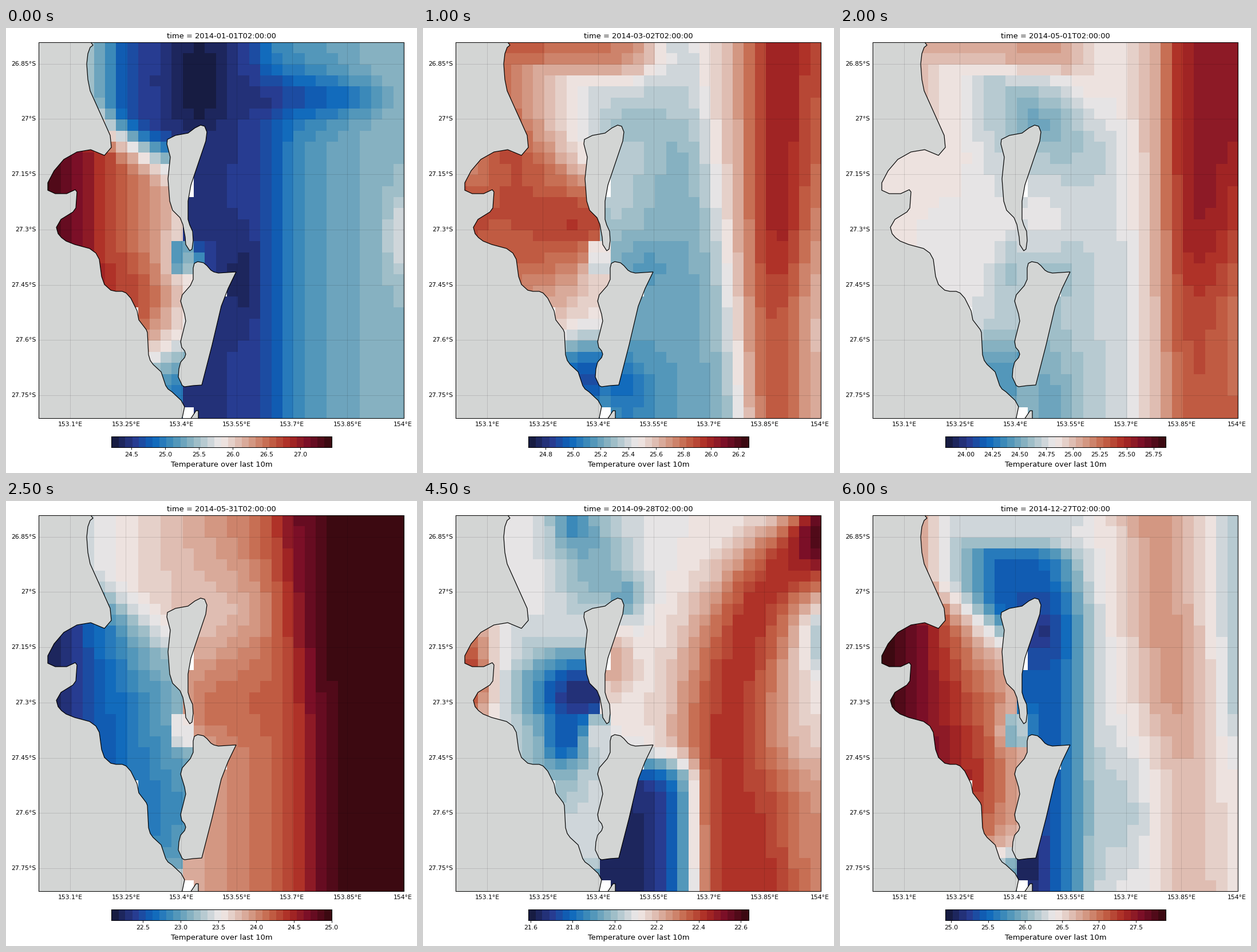
A matplotlib script for the animation above (6500 ms loop, 718 by 779 pixels).

```python
import numpy as np
import matplotlib.pyplot as plt
from matplotlib.animation import FuncAnimation
from matplotlib.colors import LinearSegmentedColormap
from matplotlib.patches import Polygon

W, H, DPI = 718, 779, 64
PX = 72 / DPI  # points per pixel
LEFT, TOP, RIGHT, BOTTOM = 57.3, 24.7, 695.4, 682.6
ROWS, COLS = 34, 33
STEPS = 13
LAND = "#d3d5d4"

plt.rcParams["font.family"] = "DejaVu Sans"

# Diverging navy - white - maroon scale
cold = ["#171c42", "#293a8f", "#0b66bd", "#4590b9", "#8eb5c2", "#d2d8db"]
warm = ["#e6d2cc", "#d59d89", "#c46548", "#ac2b24", "#780e28", "#3c0911"]
spots = [*np.linspace(0, 5 / 11, 6), 0.5, *np.linspace(6 / 11, 1, 6)]
cmap = LinearSegmentedColormap.from_list(
    "thermal", list(zip(spots, [*cold, "#f1eceb", *warm])), N=32)
cmap.set_bad("white")

y, x = np.mgrid[0:ROWS, 0:COLS].astype(float)


def step(u, at, width):
    """Smooth rise from 0 to 1."""
    return 0.5 * (1 + np.tanh((u - at) / width))


def fall(u, at, width):
    return 1 - step(u, at, width)


def bump(cx, cy, rx, ry):
    """Soft round patch of height 1."""
    return np.exp(-((x - cx) / rx) ** 2 - ((y - cy) / ry) ** 2)


# Each date gives the open sea and the bay in percent of the colour range.

def january():
    sea = (9 + 40 * fall(x, 5.5, 2.5) + 21 * step(x, 21.5, 2.5)
           + 8 * step(x, 28, 4)
           - 9 * bump(14, 3, 2.5, 5) - 14 * bump(25, 4.5, 5, 2)
           + 8 * bump(21, 0, 2, 2.5) - 6 * bump(18, 21, 1.7, 4)
           + 9 * bump(32, 17, 1.2, 4) + 25 * bump(13.5, 19.5, 1, 1.2))
    bay = (99 - 3.6 * x + 8 * bump(9, 23, 2.5, 4) - 8 * bump(12, 19, 1.2, 1.5)
           - 35 * step(y, 28, 2.5))
    return sea, bay


def late_january():
    sea = (49 + 49 * step(x, 21.2 + 0.12 * y, 1.8) - 24 * step(x, 30.3, 1.5)
           + 24 * fall(x, 16.5, 1.8) * fall(y, 9.5, 2.5)
           + 6 * bump(17, 11, 5, 6) - 18 * bump(14, 30.5, 2, 2))
    bay = (70 - 28 * bump(1, 11, 2.5, 3) - 15 * bump(1, 18, 4, 4)
           + 24 * bump(11.5, 15.5, 4, 3.5) - 18 * step(y, 20.5, 2)
           - 52 * bump(11, 29.5, 4, 3.8))
    return sea, bay


def april():
    north = (50 + 12 * fall(x, 7, 2.5)) * fall(x, 18.5, 2) * fall(y, 2.3, 1.3)
    sea = (17 + 60 * step(x, 26.3, 1.8) + north
           - 25 * step(y, 21, 5) * step(x, 26.8, 2)
           - 20 * bump(33, 20, 2.5, 12) - 12 * bump(14.5, 7, 2.5, 2)
           + 14 * bump(19, 4, 2.5, 3.5) + 14 * bump(13.5, 13.5, 3.5, 5)
           - 14 * bump(15.5, 32, 3.5, 5) - 9 * bump(16.5, 20, 2, 2))
    bay = (99 - 3.2 * x - 12 * bump(11, 11, 3, 3) - 12 * bump(12, 20.5, 1.5, 2.5)
           - 36 * step(y, 27, 2))
    return np.maximum(sea, 92 - 6 * x), bay


def may():
    edge = 21.3 + 0.14 * np.minimum(y, 18)
    sea = (39 + 1.6 * x + 17 * step(x, edge, 1.7)
           - 7 * bump(17, 8, 4, 4) + 7 * bump(15, 16.5, 4, 3.5)
           - 8 * bump(32, 29, 2, 3))
    bay = (3 + 2.6 * x + 10 * bump(11, 10, 6, 4) - 7 * bump(12, 26, 4, 5)
           + 22 * step(y, 32, 1))
    return np.minimum(sea, 98.5), bay


def july():
    sea = (93 - 40 * fall(x, 7.5, 4) - 26 * fall(x, 18, 3) * step(y, 16, 2.5)
           + 5 * bump(32, 9.5, 2.5, 5) - 2.5 * bump(25, 17, 2, 5)
           - 3 * step(y, 30, 5))
    bay = (2 + 3.3 * x + 15 * bump(10, 10, 7, 3.5)
           + 12 * bump(12, 20, 1.3, 1.6) + 20 * step(y, 32, 1.2))
    return sea, bay


def september():
    core = 23.5 + 10 * np.exp(-y / 7) + 0.06 * np.maximum(y - 20, 0)
    sea = (50 + 30 * np.exp(-((x - core) / 5) ** 2)
           + 18 * bump(32.5, 2, 2, 4.5) - 18 * bump(33, 10.5, 2.5, 3.5)
           + 14 * step(x, 27, 1.5) * step(y, 22, 3)
           - 46 * fall(x, 20.8, 1.3) * step(y, 22, 1.5)
           - 17 * bump(10, 0, 2, 2.5) - 14 * bump(12, 4, 4, 6)
           - 12 * bump(15, 7, 1.5, 1.8) + 14 * bump(13.5, 12.5, 2, 3))
    bay = (46 - 40 * bump(11, 15.5, 5, 3.4) - 22 * bump(9.5, 20, 2, 2)
           - 10 * bump(8, 23, 3, 3) + 32 * bump(0.5, 14, 2.5, 6)
           + 14 * bump(12, 19.5, 1.2, 1.5) - 25 * step(y, 32, 1.5))
    return sea, bay


def december():
    ridge = np.exp(-((x - 25 - 0.1 * y) / 3.5) ** 2)
    sea = (16 + 34 * step(x, 18.3, 1.8) + (14 - 6 * step(y, 20, 4)) * ridge
           - 10 * step(x, 31, 1) * fall(y, 20, 3)
           + 30 * fall(x, 18, 1.8) * fall(y, 2.5, 1)
           + 8 * bump(17.5, 4, 2, 3) - 8 * bump(15, 10, 1.8, 2.5)
           + 16 * bump(13, 18.5, 1.2, 1.5) - 8 * bump(22.5, 26, 3, 7)
           - 14 * bump(13, 31, 2, 5))
    bay = (103 - 3.4 * x - 8 * bump(9, 11, 4, 3) + 6 * bump(9, 23, 4, 5)
           - 14 * bump(12, 19, 1.2, 1.5) - 32 * step(y, 30, 1.5))
    return np.maximum(sea, 84 - 6 * x), bay


# step: (lowest, highest temperature, field)
KEYS = {0: (24.199, 27.467, january), 1: (23.812, 25.823, late_january),
        3: (25.538, 26.723, april), 5: (22.083, 25.002, may),
        7: (18.743, 21.830, july), 9: (21.589, 22.638, september),
        12: (24.923, 27.902, december)}

NO_DATA = [(12, 13), (13, 13), (22, 16), (24, 8), (33, 13)]

MAINLAND = [
    (50, 15), (142, 15), (148, 25), (152, 30), (147, 34), (143, 45), (141, 63),
    (143, 90), (147, 110), (182, 188), (184, 209), (172, 223), (148, 213),
    (124, 217), (101, 230), (84, 250), (73, 271), (73, 284), (86, 290),
    (106, 290), (121, 283), (124, 287), (122, 315), (117, 322), (96, 335),
    (88, 349), (91, 360), (97, 367), (105, 373), (120, 379), (146, 386),
    (157, 394), (163, 405), (167, 435), (172, 449), (183, 459), (192, 461),
    (203, 461), (210, 464), (218, 473), (229, 495), (232, 511), (245, 528),
    (247, 533), (249, 572), (252, 582), (257, 589), (271, 602), (279, 626),
    (283, 632), (290, 637), (306, 652), (312, 663), (308, 682), (305, 692),
    (50, 692)]
NORTH_ISLAND = [
    (340, 170), (347, 172), (351, 182), (349, 198), (323, 275), (318, 303),
    (318, 335), (321, 345), (326, 356), (327, 372), (325, 387), (321, 390),
    (314, 379), (313, 366), (309, 344), (304, 332), (297, 325), (291, 319),
    (286, 303), (283, 264), (287, 226), (281, 203), (282, 195), (296, 188),
    (318, 184), (330, 175)]
SOUTH_ISLAND = [
    (329, 412), (335, 409), (345, 411), (351, 416), (358, 424), (363, 427),
    (371, 429), (402, 427), (388, 456), (376, 487), (360, 555), (342, 625),
    (327, 626), (312, 628), (308, 626), (301, 611), (302, 597), (305, 585),
    (312, 577), (314, 571), (312, 565), (307, 559), (305, 549), (308, 537),
    (314, 513), (312, 501), (305, 478), (308, 467), (322, 451), (327, 440),
    (327, 420)]
ISLET = [(317, 692), (324, 682), (328, 676), (332, 670), (336, 670), (336, 692)]


def bay_share():
    """1 inside the bay, 0 in the open sea, soft along the northern mouth."""
    t = np.clip((y - 5 - 0.45 * x) / 6 + 0.5, 0, 1)
    share = np.where(x <= 12, t * t * (3 - 2 * t), 0)
    share[18:21, 12:14] = 0.5   # passage between the islands
    share[21:31, 13] = 1
    return share


SHARE = bay_share()


def blend(a, b, t):
    return (1 - t) * a + t * b


FIELDS = {k: np.clip(blend(*field(), SHARE) / 100, 0, 1)
          for k, (_, _, field) in KEYS.items()}


def state(n):
    """Field and temperature limits, blended between the known dates."""
    a = max(k for k in KEYS if k <= n)
    b = min(k for k in KEYS if k >= n)
    t = (n - a) / (b - a) if b > a else 0
    field = blend(FIELDS[a], FIELDS[b], t)
    for cell in NO_DATA:
        field[cell] = np.nan
    low, high = (blend(KEYS[a][i], KEYS[b][i], t) for i in (0, 1))
    return field, low, high


def box(x0, y0, x1, y1):
    return [x0 / W, 1 - y1 / H, (x1 - x0) / W, (y1 - y0) / H]


fig = plt.figure(figsize=(W / DPI, H / DPI), dpi=DPI, facecolor="white")

ax = fig.add_axes(box(LEFT, TOP, RIGHT, BOTTOM))
sea_image = ax.imshow(np.zeros((ROWS, COLS)), cmap=cmap, vmin=0, vmax=1,
                      extent=(LEFT, RIGHT, BOTTOM, TOP), aspect="auto",
                      interpolation="nearest")
for shape in (MAINLAND, NORTH_ISLAND, SOUTH_ISLAND, ISLET):
    ax.add_patch(Polygon(shape, facecolor=LAND, edgecolor="black",
                         linewidth=1.2 * PX))

small, large = 10.85 * PX, 13.05 * PX
for k in range(7):
    gx, gy = 112.3 + 96.8 * k, 62.7 + 96.75 * k
    ax.axvline(gx, color="black", alpha=0.15, lw=0.8 * PX)
    ax.axhline(gy, color="black", alpha=0.15, lw=0.8 * PX)
    ax.text(gx + 0.3, 694, f"{153.1 + 0.15 * k:.5g}°E", size=small,
            ha="center", va="center")
    ax.text(52.5, gy, f"{26.85 + 0.15 * k:.4g}°S", size=small,
            ha="right", va="center")
ax.set(xlim=(LEFT, RIGHT), ylim=(BOTTOM, TOP), xticks=[], yticks=[])

cax = fig.add_axes(box(184, 714.7, 569, 734))
bar = cax.imshow(np.linspace(0, 1, 385)[None], cmap=cmap, vmin=0, vmax=1,
                 aspect="auto", interpolation="nearest")
cax.set_yticks([])
cax.tick_params(length=3.8 * PX, width=0.9 * PX, pad=4.2 * PX, labelsize=small)
for spine in [*ax.spines.values(), *cax.spines.values()]:
    spine.set_linewidth(1.0 * PX)

mid = 376.5 / W
title = fig.text(mid, 1 - 14 / H, "", size=large, ha="center", va="center")
fig.text(mid, 1 - 764.6 / H, "Temperature over last 10m", size=large,
         ha="center", va="center")

START = np.datetime64("2014-01-01T02:00:00")


def draw(n):
    field, low, high = state(n)
    sea_image.set_data(np.ma.masked_invalid(field))
    title.set_text(f"time = {START + np.timedelta64(30 * n, 'D')}")

    gap = next(g for g in (0.1, 0.2, 0.25, 0.5) if g >= (high - low) / 9)
    ticks = gap * np.arange(np.ceil(low / gap), np.floor(high / gap) + 1)
    digits = 2 if gap == 0.25 else 1
    bar.set_extent((low, high, 0, 1))
    cax.set_xlim(low, high)
    cax.set_xticks(ticks, [f"{t:.{digits}f}" for t in ticks])
    return sea_image, title, bar


anim = FuncAnimation(fig, draw, frames=STEPS, interval=500, repeat=True,
                     repeat_delay=0, blit=False)
plt.show()
```
